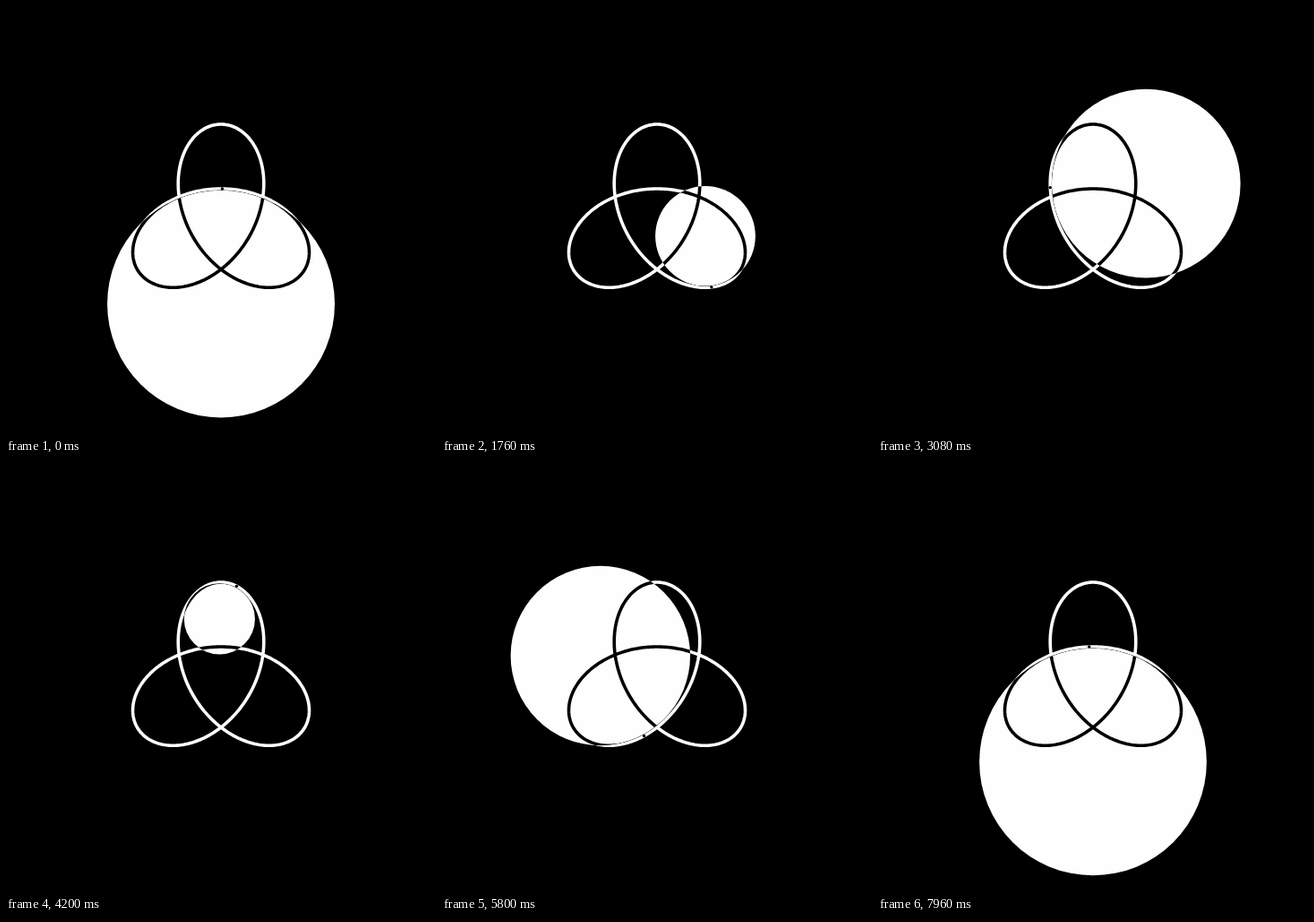
Recreate the animation shown at these times as an HTML page. Size 480 by 480 pixels, loop 8 s.

```html
<!DOCTYPE html>
<html lang="en">
<head>
<meta charset="utf-8">
<title>Osculating circle of a trefoil</title>
<style>
  html, body { margin: 0; width: 100%; height: 100%; overflow: hidden; background: #000; }
  svg { display: block; width: 100vw; height: 100vh; isolation: isolate; }
  #disc { mix-blend-mode: difference; }
</style>
</head>
<body>
<svg viewBox="0 0 480 480">
  <rect width="480" height="480" fill="#000"/>
  <path id="curve" fill="none" stroke="#fefefe" stroke-width="3.6" stroke-linejoin="round"/>
  <circle id="disc" fill="#fefefe"/>
  <circle id="dot" r="1.7" fill="#000"/>
</svg>
<script>
const LOOP = 8000, STEP = 40, LEAD = 10;
const CENTER = 240, SIZE = 36, INSET = 1.6;
const { sin, cos, PI, hypot } = Math;
const [curve, disc, dot] = ['curve', 'disc', 'dot'].map(id => document.getElementById(id));

const point = t => [
  CENTER - SIZE * (sin(t) - 2 * sin(2 * t)),
  CENTER - SIZE * (cos(t) + 2 * cos(2 * t))
];

// Centre and radius of curvature from the first and second derivatives.
function osculating(t) {
  const [x, y] = point(t);
  const dx = -SIZE * (cos(t) - 4 * cos(2 * t));
  const dy = SIZE * (sin(t) + 4 * sin(2 * t));
  const ddx = SIZE * (sin(t) - 8 * sin(2 * t));
  const ddy = SIZE * (cos(t) + 8 * cos(2 * t));
  const speed = hypot(dx, dy);
  const cross = dx * ddy - dy * ddx;
  const k = speed * speed / cross;
  return { x, y, cx: x - dy * k, cy: y + dx * k, r: Math.abs(speed ** 3 / cross) };
}

function place(circle, x, y) {
  circle.setAttribute('cx', x.toFixed(3));
  circle.setAttribute('cy', y.toFixed(3));
}

function draw(ms) {
  const time = Math.floor((ms % LOOP) / STEP) * STEP + LEAD;
  const o = osculating(PI + 2 * PI * time / LOOP);
  place(disc, o.cx, o.cy);
  disc.setAttribute('r', (o.r - INSET).toFixed(3));
  place(dot, o.x, o.y);
}

const outline = Array.from({ length: 480 }, (_, i) =>
  point(2 * PI * i / 480).map(v => v.toFixed(2)).join(' '));
curve.setAttribute('d', 'M' + outline.join('L') + 'Z');

let start;
function tick(now) {
  start ??= now;
  draw(now - start);
  requestAnimationFrame(tick);
}
draw(0);
requestAnimationFrame(tick);
</script>
</body>
</html>
```
